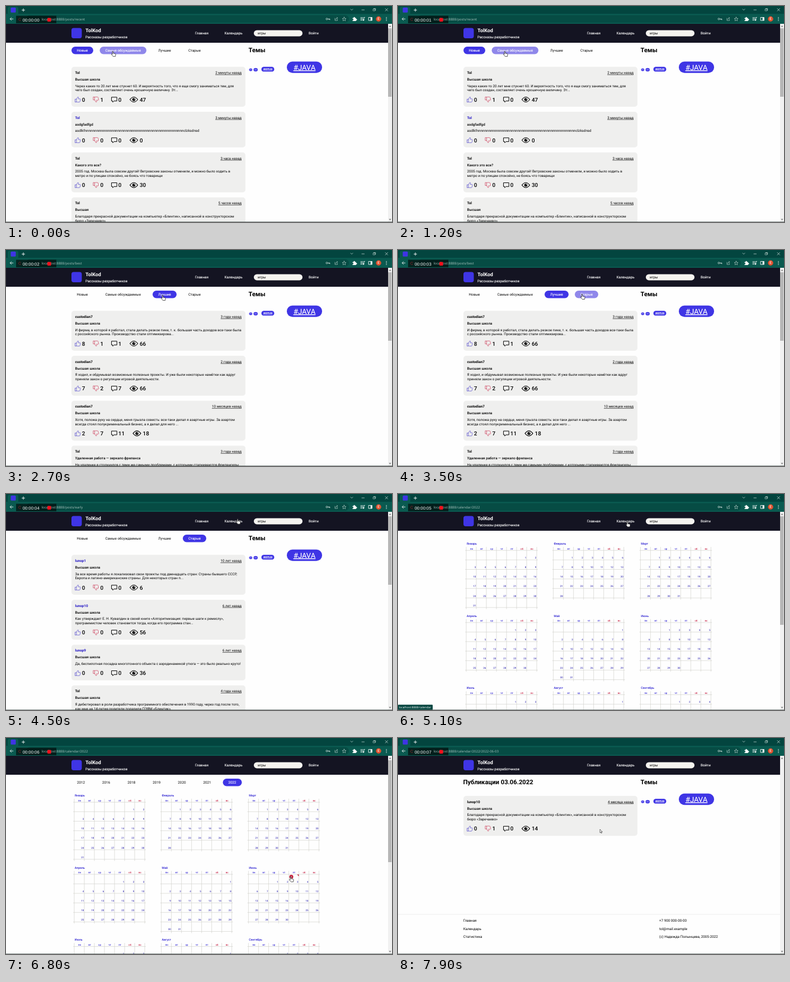
Recreate the animation shown at these times as an HTML page. Size 690 by 388 pixels, loop 8000 ms.

```html
<!DOCTYPE html>
<html lang="ru">
<head>
<meta charset="utf-8">
<title>Рассказы разработчиков</title>
<style>
html, body { margin: 0; width: 100%; height: 100%; overflow: hidden; background: #fff; }
svg { display: block; width: 100vw; height: 100vh; }
text { font: 6.29px Roboto, Arial, sans-serif; fill: #000; text-rendering: geometricPrecision; white-space: pre; }
.b { font-weight: 700; }
.m { font-weight: 500; }
.w { fill: #fff; stroke: #fff; stroke-width: .12px; }
.link { fill: #2013c4; }
.h1 { font-size: 11.2px; font-weight: 700; }
.brand { font-size: 9px; font-weight: 700; fill: #fff; }
.num { font-size: 9.9px; font-weight: 500; }
.month { font-size: 5.3px; font-weight: 500; fill: #2a1fd0; }
.day { font-size: 4.5px; fill: #1d14a8; }
.wd { font-size: 4.4px; font-weight: 500; fill: #2a1fd0; text-anchor: middle; }
.we { fill: #c2183c; }
.tag { font-size: 13px; }
.tiny { font-size: 4px; font-weight: 700; }
.url { font: 6px "Open Sans", "Noto Sans", sans-serif; fill: #a9c4be; }
.status { font-size: 5.2px; fill: #fff; }
.clock { font: 7.7px "Liberation Sans", Arial, sans-serif; fill: #fff; }
.end { text-anchor: end; }
.mid { text-anchor: middle; }
.u { text-decoration: underline; }
.when { text-decoration: underline dotted; text-underline-offset: 1.3px; }
.line { fill: none; stroke-linecap: round; stroke-linejoin: round; }
#cursor { animation: move 8s ease-in-out infinite; }
@keyframes move {
  0%, 18.75% { transform: translate(190px, 81px); }
  22.5%, 23.75% { transform: translate(248px, 81px); }
  27.5% { transform: translate(274px, 81px); }
  28.75%, 33.75% { transform: translate(279px, 81px); }
  41.25%, 48.75% { transform: translate(328px, 79px); }
  56.25%, 58.75% { transform: translate(413px, 44.5px); }
  63.75%, 71.25% { transform: translate(409px, 49.5px); }
  78.75%, 87% { transform: translate(508px, 248.7px); }
  95% { transform: translate(372px, 172px); }
  98.5%, 100% { transform: translate(361px, 164px); }
}
</style>
</head>
<body>
<svg id="stage" viewBox="0 0 690 388" preserveAspectRatio="none"></svg>
<script>
const LOOP = 8000, BLUE = '#3f35e5', PALE = '#8f87ea', STRIP = '#03453f', BAR = '#0a5a50';
let css = '', count = 0;

// Shows the markup only between two times of the loop, with hard cuts.
function during(from, to, markup) {
  const name = 'show' + count++, pct = t => t / LOOP * 100 + '%';
  css += `@keyframes ${name}{0%{opacity:0}${pct(from)}{opacity:1}${pct(to)}{opacity:${to < LOOP ? 0 : 1}}}`;
  return `<g style="opacity:0;animation:${name} 8s step-end infinite">${markup}</g>`;
}
const text = (x, y, s, cls = '') => `<text x="${x}" y="${y}" class="${cls}">${s}</text>`;
const rect = (x, y, w, h, fill, r = 0) =>
  `<rect x="${x}" y="${y}" width="${w}" height="${h}" rx="${r}" fill="${fill}"/>`;
const line = (d, color, width = 1) => `<path class="line" d="${d}" stroke="${color}" stroke-width="${width}"/>`;
const dot = (x, y, r, fill) => `<circle cx="${x}" cy="${y}" r="${r}" fill="${fill}"/>`;
const at = (x, y, s) => `<g transform="translate(${x} ${y})">${s}</g>`;

function chrome() {
  const c = '#d5e4e0';
  return rect(0, 0, 690, 14.5, STRIP) + rect(0, 14, 690, 18, BAR) +
    rect(3, 1.5, 19, 14, BAR, 3) + rect(8.5, 2.8, 9, 9, BLUE, 1.5) +
    rect(36, 16.5, 577, 13.5, '#064c44', 6.7) +
    line('M28.5 7.3h5M31 4.8v5', '#fff', .9) +
    line('M616 5.5l2 2 2-2M636 7h4.5M678 4.5l4.5 4.5m0-4.5l-4.5 4.5', c, .7) +
    line('M656.5 5.5h3.2v3.2h-3.2zM657.5 5.5v-1h3.2v3.2h-1', c, .6) +
    line('M12.8 23.3h-5.3m2.3-2.5l-2.5 2.5 2.5 2.5', '#fff', .8) +
    line('M575 23.3a1.5 1.5 0 1 0-3 0 1.5 1.5 0 0 0 3 0h4v1.5m-1.5-1.5v1.2', c, .8) +
    line('M588 22v4h4.5v-1.8M589.5 24q.5-2.5 3-2.5m-1-1.3l1.3 1.3-1.3 1.3', c, .6) +
    line('M604.5 20l1 2.3 2.4.2-1.8 1.7.5 2.5-2.1-1.3-2.1 1.3.5-2.5-1.8-1.7 2.4-.2z', c, .6) +
    '<path d="M619.5 21.5h2a1.2 1.2 0 1 1 2.2 0h2v2a1.2 1.2 0 1 1 0 2v1.5h-6.2v-1.7a1.1 1.1 0 1 0 0-2z" fill="#fff"/>' +
    line('M634 21h4M634 23.2h4M634 25.4h2.5M639.8 25v-4.5h1.5', '#fff', .9) + dot(638.9, 25.3, 1.2, '#fff') +
    line('M648.5 20.5h5.8v5.5h-5.8z', '#fff', .9) + rect(651.7, 20.5, 2.6, 5.5, '#fff') +
    dot(666, 23.3, 4.7, '#e2512e') + text(666, 25.4, 'E', 'w mid') +
    [20.7, 23.3, 25.9].map(y => dot(680, y, .75, '#fff')).join('');
}

function header() {
  return rect(0, 32, 683, 34, '#141422') + rect(117, 39.5, 18.5, 18.5, BLUE, 4) +
    text(142, 47.3, 'TolKod', 'brand') + text(142, 58, 'Рассказы разработчиков', 'w') +
    text(338, 51.3, 'Главная', 'w') + text(390.5, 51.3, 'Календарь', 'w') +
    rect(443, 43.4, 87, 11, '#f4f3ef', 5.5) + text(450, 51, 'игры') + text(541, 51.3, 'Войти', 'w');
}

const recorderBox = '<rect x="18" y="17.5" width="72" height="13.5" opacity=".6"/>' +
  line('M26.5 22.5a2.3 2.3 0 1 0 .3 2.6', '#7c2024', .9);

function recorder() {
  let s = text(29.7, 27.8, '00:00:0', 'clock') + rect(74, 21.5, 6.5, 6.5, '#f5101c', 1);
  for (let i = 0; i < 8; i++) s += during(i * 1000, i * 1000 + 1000, text(55.4, 27.8, i, 'clock'));
  return s;
}

function scrollbar(thumb) {
  return rect(683, 32, 7, 356, '#f1f1f1') +
    '<path d="M684.5 37.5l2-2.5 2 2.5zM684.5 382.5l2 2.5 2-2.5z" fill="#777"/>' +
    (thumb ? rect(683, 40, 6.3, thumb, '#b6b6b6') : '');
}

const url = path => text(63.5, 25.6, 'localhost:8888/' + path, 'url');

const pill = (x, w, label, fill) =>
  (fill ? rect(x, 73, w, 13.6, fill, 6.8) : '') + text(x + w / 2, 82, label, fill ? 'w mid' : 'mid');

const TABS = [[117, 39, 'Новые'], [167.5, 83.5, 'Самые обсуждаемые'], [262, 43, 'Лучшие'], [316, 42, 'Старые']];
const tabs = active => TABS.map((t, i) => pill(...t, i === active && BLUE)).join('');

function topics() {
  return text(433.5, 83.3, 'Темы', 'h1') + rect(434.5, 112.3, 5.8, 4.6, BLUE, 2.3) +
    rect(442.5, 111.5, 7.5, 6, BLUE, 3) + line('M436 114.6h2.8M444.3 114.6h4', '#d9d6ff', .7) +
    rect(456.5, 109.3, 23, 8.8, BLUE, 4.4) + text(468, 115.2, '#KOTLIN', 'w u mid tiny') +
    rect(502, 99.8, 63, 20.5, BLUE, 10) + text(533.5, 114.7, '#JAVA', 'w u mid tag');
}

const THUMB = 'M.3 4.3h2v5.3h-2zM2.3 4.6l2.4-4.1q1.7-.2 1.5 1.6l-.4 1.7h3q.9.2.7 1.2l-.8 3.7q-.3.9-1.2.9h-3.7l-1.5-.5';

function stats(y, [likes, dislikes, replies, views]) {
  const x = 221 + 5.55 * (String(replies).length - 1), n = (nx, v) => text(nx, y + 3.5, v, 'num');
  return at(123.5, y - 5, line(THUMB, '#5b52cc', .75)) + n(135.7, likes) +
    at(156, y + 5, `<g transform="scale(1 -1)">${line(THUMB, '#cf4560', .75)}</g>`) + n(168.5, dislikes) +
    at(189, y - 5, line('M0 .8h9.2v6.8h-5.2l-2.2 2.2v-2.2h-1.8z', '#000')) + n(200.8, replies) +
    at(x + 7.5, y, line('M-7 0Q0-9 7 0Q0 9-7 0z', '#000', 1.1) +
      dot(0, 0, 2.7, '#000') + dot(.9, -.9, .8, '#fff')) + n(x + 18, views);
}

function posts(list, y = 109.3) {
  return list.map(([author, when, title, body, nums, linked]) => {
    const rows = body.split('|'), h = 64 + 7.7 * (rows.length - 1);
    const card = rect(117, y, 311, h, '#efefee', 5) +
      text(123.5, y + 12.7, author, linked ? 'b link' : 'b') + text(421, y + 12.7, when, 'end when') +
      text(123.5, y + 24.5, title, 'm') +
      rows.map((r, i) => text(123.5, y + 36.2 + i * 7.7, r)).join('') + stats(y + h - 13, nums);
    y += h + 9;
    return card;
  }).join('');
}

const SCHOOL = 'Высшая школа', MOD = 'custodian7', TOL = 'Tol';
const bets = [MOD, '10 месяцев назад', SCHOOL,
  'Хотя, положа руку на сердце, меня грызла совесть: все-таки делал я азартные игры. За азартом|всегда стоял полукриминальный бизнес, а я делал для него ...', [2, 7, 11, 18]];
const ideas = [MOD, '2 года назад', SCHOOL,
  'Я ходил, и обдумывал возможные полезные проекты. И уже были некоторые намётки как вдруг|приняли закон о регуляции игровой деятельности.', [7, 2, 7, 66]];
const firm = [MOD, '3 года назад', SCHOOL,
  'И фирма, в которой я работал, стала делать резкое пике, т. к. большая часть доходов все-таки была|с российского рынка. Производство стали оптимизирова...', [8, 1, 1, 66]];
const DOCS = 'Благодаря прекрасной документации на компьютер «Блинтик», написанной в конструкторском|бюро «Заречаево»';

const recent = [
  [TOL, '2 минуты назад', SCHOOL, 'Через каких-то 20 лет мне стукнет 60. И вероятность того, что я еще смогу заниматься тем, для|чего был создан, составляет очень крошечную величину. Эт...', [0, 1, 0, 47]],
  [TOL, '3 минуты назад', 'asdgfadfgd', 'asdlkf' + 'n'.repeat(51) + 'clzksdnsd', [0, 0, 0, 0], true],
  [TOL, '3 часа назад', 'Какого это все?', '2005 год. Москва была совсем другой! Ветровские законы отменили, и можно было ходить в|метро и по улицам спокойно, не боясь что товарищи', [0, 0, 0, 30]],
  [TOL, '5 часов назад', 'Высшая', DOCS, [0, 0, 0, 0]]
];
const popular = [bets, ideas,
  [TOL, 'день назад', 'Игры', 'Исторически, игры собирались из Си и Си++ кода, потихоньку перебираясь полностью на плюсы.|Приходилось писать и низкоуровневые вещи, и фронтэнд на Ope...', [0, 1, 7, 17]],
  firm];
const best = [firm, ideas, bets,
  [TOL, '3 года назад', 'Удаленная работа — зеркало фриланса', 'На удаленке я столкнулся с теми же самыми проблемами, с которыми сталкиваются фрилансеры|', [0, 0, 0, 0]]];
const early = [
  ['lunop1', '10 лет назад', SCHOOL, 'За все время работы я локализовал свои проекты под двенадцать стран: Страны бывшего СССР,|Европа и латино-американские страны. Для некоторых стран п...', [0, 0, 0, 6], true],
  ['lunop10', '6 лет назад', SCHOOL, 'Как утверждает Е. Н. Кувалдин в своей книге «Алгоритмизация: первые шаги к ремеслу»,|программистом человек становится тогда, когда его программа стан...', [0, 0, 0, 56], true],
  ['lunop9', '6 лет назад', SCHOOL, 'Да, беспилотная посадка многотонного объекта с аэродинамикой утюга — это было реально круто!', [0, 0, 0, 36], true],
  [TOL, '4 года назад', SCHOOL, 'Я дебютировал в роли разработчика программного обеспечения в 1990 году, через год после того,|как мне на 14-летие родители подарили ПЭВМ «Блинтик».', [0, 0, 0, 0]]
];
const found = [['lunop10', '4 месяца назад', SCHOOL, DOCS, [0, 1, 0, 14]]];

// Each month: name, number of days, column of the first day.
const MONTHS = [['Январь', 31, 5], ['Февраль', 28, 1], ['Март', 31, 1], ['Апрель', 30, 4], ['Май', 31, 6],
  ['Июнь', 30, 2], ['Июль', 31, 4], ['Август', 31, 6], ['Сентябрь', 30, 3]];

function month([name, days, first], i) {
  const x = 122 + i % 3 * 155.7, y = 91 + Math.floor(i / 3) * 129.6, top = y + 10.3, row = 17.1;
  const rows = Math.ceil((days + first) / 7);
  let s = text(x + .8, y, name, 'month'), d = '';
  'пн вт ср чт пт сб вс'.split(' ').forEach((w, c) => {
    s += text(x + 9.5 + c * 18, y + 8.6, w, c > 4 ? 'wd we' : 'wd');
  });
  for (let c = 0; c <= 7; c++) d += `M${x + 18 * c} ${y + 4.5}V${top + rows * row + 2.5}`;
  for (let r = 0; r <= rows; r++) d += `M${x - 1.5} ${top + r * row}h129`;
  s = line(d, '#cbcbc4', .6) + s;
  for (let n = 1; n <= days; n++) {
    const cell = n + first - 1;
    s += text(x + 18 * (cell % 7 + 1) - .8, top + Math.floor(cell / 7) * row + 14.8, n, 'day end');
  }
  return s;
}
const months = MONTHS.map(month).join('');
const years = [2012, 2016, 2018, 2019, 2020, 2021, 2022]
  .map((y, i) => pill(117 + i * 45.1, 34, y, i === 6 && BLUE)).join('');

const badge = '<path d="M520.3 245.3h3.2v3.2z" fill="#c81e3a"/>' + dot(510, 249.3, 3.5, '#c81e3a') +
  text(510, 250.8, '1', 'w mid tiny');

function footer() {
  const left = ['Главная', 'Календарь', 'Статистика'];
  const right = ['+7 900 000-00-00', 'tol@mail.example', '(с) Надежда Полынцева, 2005-2022'];
  return rect(0, 316.5, 683, .7, '#e6e6e6') +
    left.map((s, i) => text(116.7, 329.7 + i * 14.8, s) + text(467, 329.7 + i * 14.8, right[i])).join('');
}

const feed = (from, to, path, active, list, hover = '') =>
  during(from, to, url('posts/' + path) + tabs(active) + hover + topics() + posts(list) + scrollbar(123));
const hover = (from, to, i) => during(from, to, pill(...TABS[i], PALE));

const HAND = '<path d="M.2.8q.8-1.3 1.7 0v3.2l3 .6q1.3.3 1.2 1.6l-.6 3.4h-4l-2.8-3.3q-.5-1.1.6-1.2l.9.7z" fill="#fff" stroke="#111" stroke-width=".7"/>';
const ARROW = '<path d="M0 0v6.2l1.4-1.3 1 2.2 1-.5-1-2.1h1.9z" fill="#fff" stroke="#111" stroke-width=".6"/>';
// The pointer alternates between hand and arrow at these times.
const SWAPS = [0, 2000, 2080, 2900, 3050, 4000, 4300, 5800, 6250, 7000, LOOP];
const pointer = SWAPS.slice(1).map((end, i) => during(SWAPS[i], end, i % 2 ? ARROW : HAND)).join('');

document.getElementById('stage').innerHTML = rect(0, 0, 690, 388, '#fefefe') + chrome() + header() + recorderBox +
  feed(0, 1500, 'recent', 0, recent, hover(0, 1500, 1)) +
  feed(1500, 2700, 'popular', 1, popular, hover(2100, 2700, 2)) +
  feed(2700, 3900, 'best', 2, best, hover(3100, 3900, 3)) +
  feed(3900, 4800, 'early', 3, early) +
  during(4800, 6950, url('calendar/2022')) +
  during(4800, 5200, months + scrollbar(195)) +
  during(5200, 6950, years + at(0, 14, months) + scrollbar(183)) +
  during(6500, 6950, badge) +
  during(6950, 8000, url('calendar/2022/2022-06-03') + text(116.5, 83.3, 'Публикации 03.06.2022', 'h1') +
    topics() + posts(found, 104) + footer() + scrollbar(0)) +
  during(5000, 5850, rect(0, 378.5, 62, 9.5, STRIP, 1) + text(1.5, 385, 'localhost:8888/calendar', 'url status')) +
  recorder() + rect(0, 387.3, 690, .7, '#5a6664') + `<g id="cursor">${pointer}</g>`;

const style = document.createElement('style');
style.textContent = css;
document.head.append(style);
</script>
</body>
</html>
```
